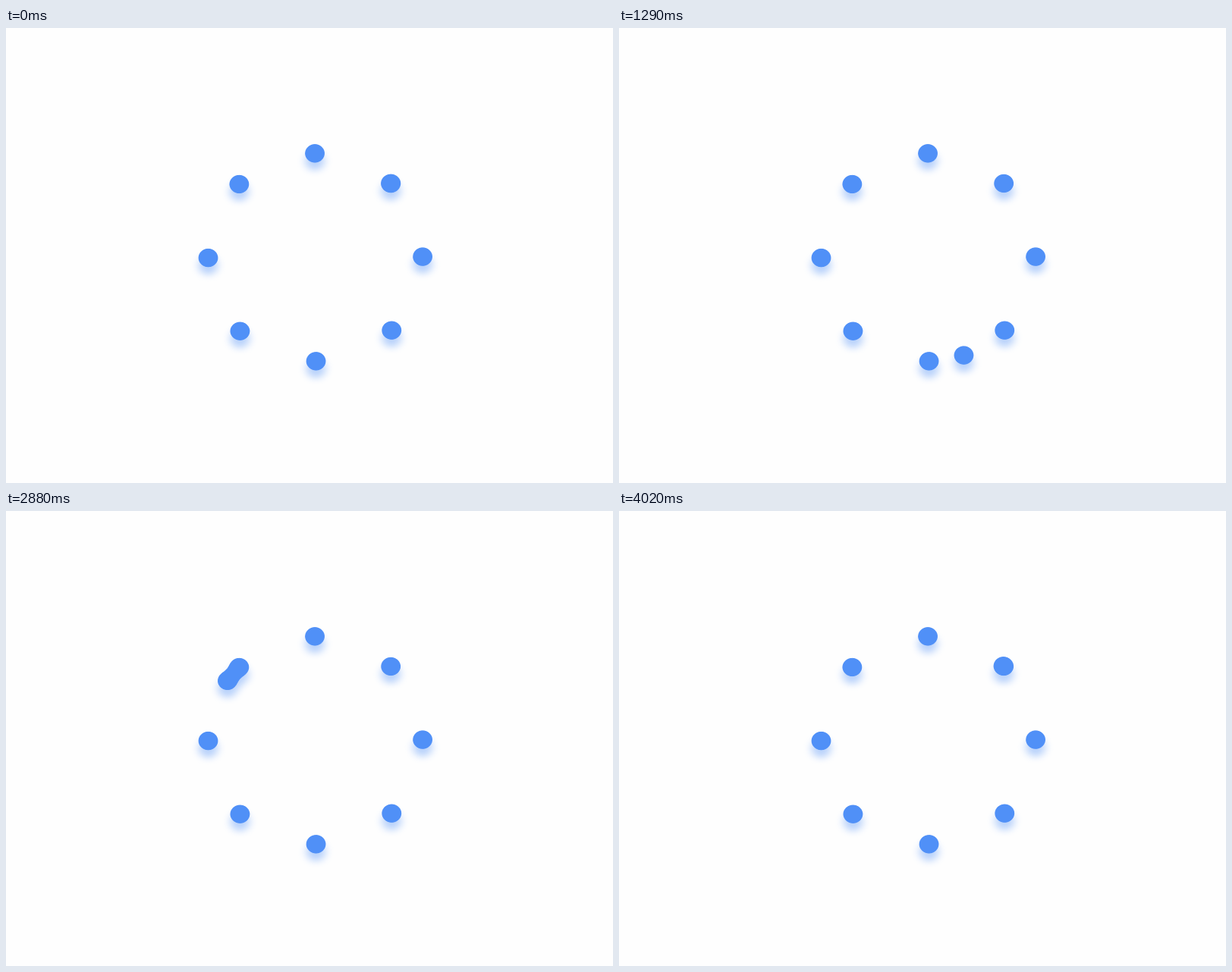
An HTML page that plays this animation: 800 px wide and 600 px high, repeating every 4.05 s.

```html
<!DOCTYPE html>
<html lang="en">
<head>
<meta charset="utf-8">
<title>Dot loader</title>
<style>
  html, body { margin: 0; width: 100%; height: 100%; overflow: hidden; background: #fefefe; }
  svg { display: block; }
</style>
</head>
<body>
<svg width="800" height="600" viewBox="0 0 800 600">
  <filter id="goo" filterUnits="userSpaceOnUse" x="-200" y="-200" width="400" height="400"
          color-interpolation-filters="sRGB">
    <feGaussianBlur stdDeviation="6"/>
    <feColorMatrix values="1 0 0 0 0  0 1 0 0 0  0 0 1 0 0  0 0 0 18 -7" result="blob"/>
    <feFlood flood-color="#5090f7"/>
    <feComposite in2="blob" operator="in" result="dots"/>
    <feGaussianBlur stdDeviation="5"/>
    <feOffset dy="10"/>
    <feComponentTransfer result="shadow"><feFuncA type="linear" slope="0.4"/></feComponentTransfer>
    <feMerge><feMergeNode in="shadow"/><feMergeNode in="dots"/></feMerge>
  </filter>
  <g id="ring" transform="translate(407.8 302.3) scale(1.0314 1)" filter="url(#goo)" fill="#5090f7"></g>
</svg>
<script>
  const LOOP = 4050, COUNT = 8, RADIUS = 137, TILT = -0.31;
  const ring = document.getElementById('ring');

  function addDot() {
    const dot = document.createElementNS('http://www.w3.org/2000/svg', 'circle');
    dot.setAttribute('r', 12.5);
    return ring.appendChild(dot);
  }

  // Places a dot at a ring position counted in steps from the upper right.
  function place(dot, step) {
    const angle = ((step - 1) * 360 / COUNT + TILT) * Math.PI / 180;
    dot.setAttribute('cx', RADIUS * Math.cos(angle));
    dot.setAttribute('cy', RADIUS * Math.sin(angle));
  }

  for (let i = 0; i < COUNT; i++) place(addDot(), i);
  const runner = addDot();
  const ease = u => (1 - Math.cos(Math.PI * u)) / 2;
  const start = performance.now();

  function draw() {
    const pos = (performance.now() - start) % LOOP / LOOP * COUNT;
    const step = Math.floor(pos);
    place(runner, step + ease(pos - step));
    requestAnimationFrame(draw);
  }
  draw();
</script>
</body>
</html>
```
